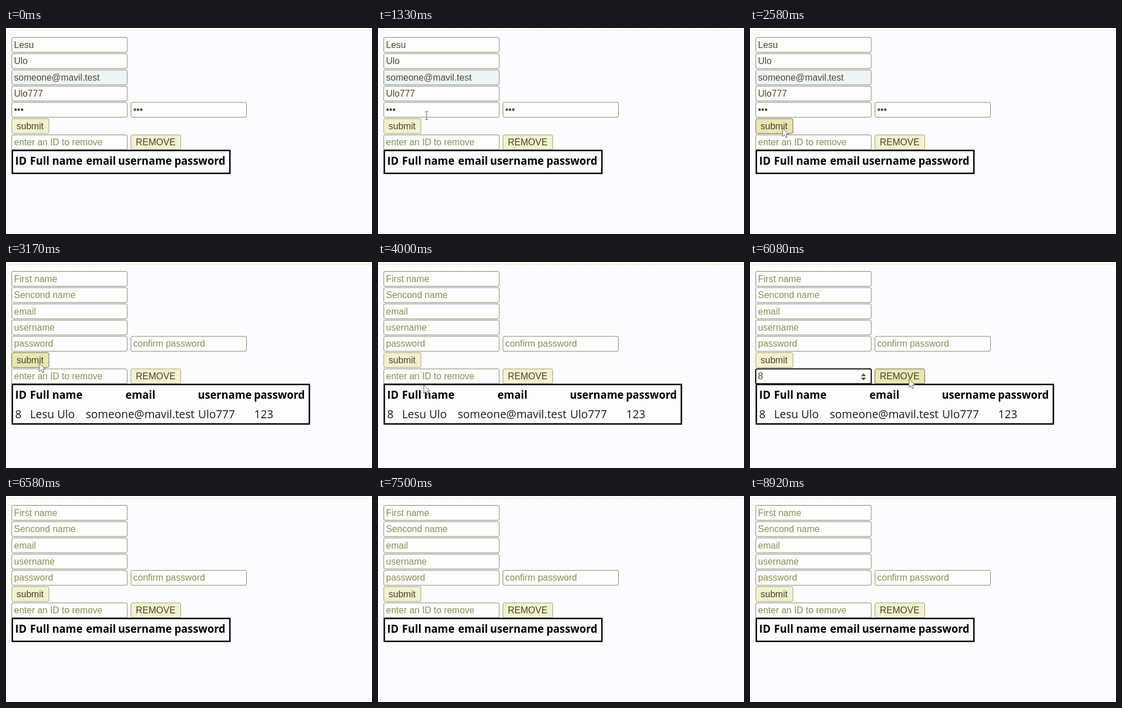
Write an HTML page that moves like this. It is 640 px wide and 360 px high and loops after 9010 ms.

```html
<!DOCTYPE html>
<html lang="en">
<head>
<meta charset="utf-8">
<title>Sign-up table</title>
<style>
  html, body { margin: 0; width: 100%; height: 100%; overflow: hidden; background: #fcfcfe; }
  svg { display: block; width: 640px; height: 360px; }
  .ui { font: 16px "Liberation Sans", Arial, sans-serif; }
  .head { font: bold 18.7px "Open Sans", sans-serif; }
  .cell { font: 19.5px "Open Sans", sans-serif; fill: #1c1c12; }
</style>
</head>
<body>
<svg id="stage" viewBox="0 0 640 360"></svg>
<script>
const LOOP = 9010;
const SUBMIT = 32, FOCUS = 58, TYPE = 63, BLUR = 74, REMOVE = 76;
const ENTER = 6, EXIT = 79;
const INK = '#4c4c28', HINT = '#8d8d58', LINE = '#85856c';
const stage = document.getElementById('stage');

function add(tag, attrs, parent = stage) {
  const el = document.createElementNS('http://www.w3.org/2000/svg', tag);
  for (const k in attrs) el.setAttribute(k, attrs[k]);
  return parent.appendChild(el);
}
function label(x, y, cls, text = '', parent = stage) {
  const el = add('text', { x, y, class: cls }, parent);
  el.textContent = text;
  return el;
}
const show = (el, on) => el.setAttribute('visibility', on ? 'visible' : 'hidden');
const rowTop = i => 16.4 + 28.4 * i;

function box(x, row, w, fill) {
  const y = rowTop(row);
  const rect = add('rect', { x: x + .5, y, width: w - 1, height: 26, rx: 2.5, fill, stroke: LINE });
  return { x, y, w, h: 26, rect };
}
function field(x, row, hint, value) {
  const f = box(x, row, 203, '#fdfdfe');
  f.text = label(x + 4.5, f.y + 18.4, 'ui');
  f.set = filled => {
    f.text.textContent = filled ? value : hint;
    f.text.setAttribute('fill', filled ? INK : HINT);
  };
  return f;
}
function button(x, row, w, text) {
  const b = box(x, row, w, '#f3f1cf');
  b.text = label(x + 9, b.y + 18.4, 'ui', text);
  b.text.setAttribute('fill', '#45452f');
  return b;
}
const inside = (b, x, y) => x > b.x && x < b.x + b.w && y > b.y && y < b.y + b.h;

add('rect', { width: 640, height: 360, fill: '#fcfcfe' });
add('path', { d: 'M0 4.5H640', stroke: '#dcdc9c', 'stroke-dasharray': '2 2' });

const fields = [
  field(9.5, 0, 'First name', 'Lesu'),
  field(9.5, 1, 'Sencond name', 'Ulo'),
  field(9.5, 2, 'email', 'someone@mavil.test'),
  field(9.5, 3, 'username', 'Ulo777'),
  field(9.5, 4, 'password', '•••'),
  field(218, 4, 'confirm password', '•••')
];
const submit = button(9.5, 5, 66, 'submit');
const idField = field(9.5, 6, 'enter an ID to remove', '8');
const remove = button(218, 6, 88, 'REMOVE');
const spinner = add('path', { d: 'M194 199.5l4.5 -5l4.5 5zM194 202l4.5 5l4.5 -5z', fill: '#55553c' });

const frame = add('rect', { x: 11, y: 214, fill: '#fdfdfe', stroke: '#000', 'stroke-width': 2.5 });
const heads = ['ID', 'Full name', 'email', 'username', 'password']
  .map(s => label(0, 239, 'head', s));
const narrow = [16, 42, 140, 196, 294.5], wide = [16, 42, 209, 335.5, 433.5];
const record = add('g', {});
['8', 'Lesu Ulo', 'someone@mavil.test', 'Ulo777', '123']
  .forEach((s, i) => label([16, 42, 139.5, 336, 434][i], 272.5, 'cell', s, record));

const arrow = add('path', {
  d: 'M0 0V14.5L3.4 11.4L5.8 16.8L8.3 15.7L6 10.4H10.6Z',
  fill: '#fff', stroke: '#66664a', 'stroke-width': 1, 'stroke-linejoin': 'round'
});
const beam = add('path', {
  d: 'M-3 -7H-1L0 -6L1 -7H3M0 -6V6M-3 7H-1L0 6L1 7H3',
  fill: 'none', stroke: '#77775a', 'stroke-width': 1.1
});

// Pointer stops: step, x, y
const path = [
  [ENTER, 636, 262], [11, 240, 250], [16, 85, 153], [24, 60, 172], [29, 57, 175],
  [37, 57, 175], [44, 76, 208], [48, 80, 215], [54, 92, 203], [64, 92, 203],
  [71, 274, 203], [73, 278, 204.5], [76, 278, 204.5], [EXIT, 640, 250]
];
function pointer(k) {
  let i = 0;
  while (i < path.length - 2 && k >= path[i + 1][0]) i++;
  const [a, b] = [path[i], path[i + 1]];
  const u = Math.min(1, Math.max(0, (k - a[0]) / (b[0] - a[0])));
  const e = u * u * (3 - 2 * u);
  return [a[1] + (b[1] - a[1]) * e, a[2] + (b[2] - a[2]) * e];
}

function render(ms) {
  const k = Math.floor((ms / 10 + .5) * .12);
  const [x, y] = pointer(k);
  const here = k >= ENTER && k < EXIT;
  const over = b => here && inside(b, x, y);

  const filled = k < SUBMIT;
  fields.forEach(f => f.set(filled));
  fields[2].rect.setAttribute('fill', filled ? '#eff4f8' : '#fdfdfe');

  for (const b of [submit, remove]) {
    const on = over(b);
    b.rect.setAttribute('fill', on ? '#e9e6b0' : '#f3f1cf');
    b.rect.setAttribute('stroke', on ? '#6c6c50' : '#a3a37c');
  }

  const focus = k >= FOCUS && k < BLUR;
  idField.set(k >= TYPE && k < REMOVE);
  idField.rect.setAttribute('stroke', focus ? '#14140c' : LINE);
  idField.rect.setAttribute('stroke-width', focus ? 2 : 1);
  show(spinner, focus || over(idField));

  const listed = k >= SUBMIT && k < REMOVE;
  frame.setAttribute('width', listed ? 519.5 : 380.5);
  frame.setAttribute('height', listed ? 69 : 40);
  heads.forEach((h, i) => h.setAttribute('x', (listed ? wide : narrow)[i]));
  show(record, listed);

  const typing = [...fields, idField].some(over);
  const at = `translate(${x.toFixed(1)} ${y.toFixed(1)})`;
  arrow.setAttribute('transform', at);
  beam.setAttribute('transform', at);
  show(arrow, here && !typing);
  show(beam, here && typing);
}

const start = performance.now();
function tick() {
  render((performance.now() - start) % LOOP);
  requestAnimationFrame(tick);
}
tick();
</script>
</body>
</html>
```
